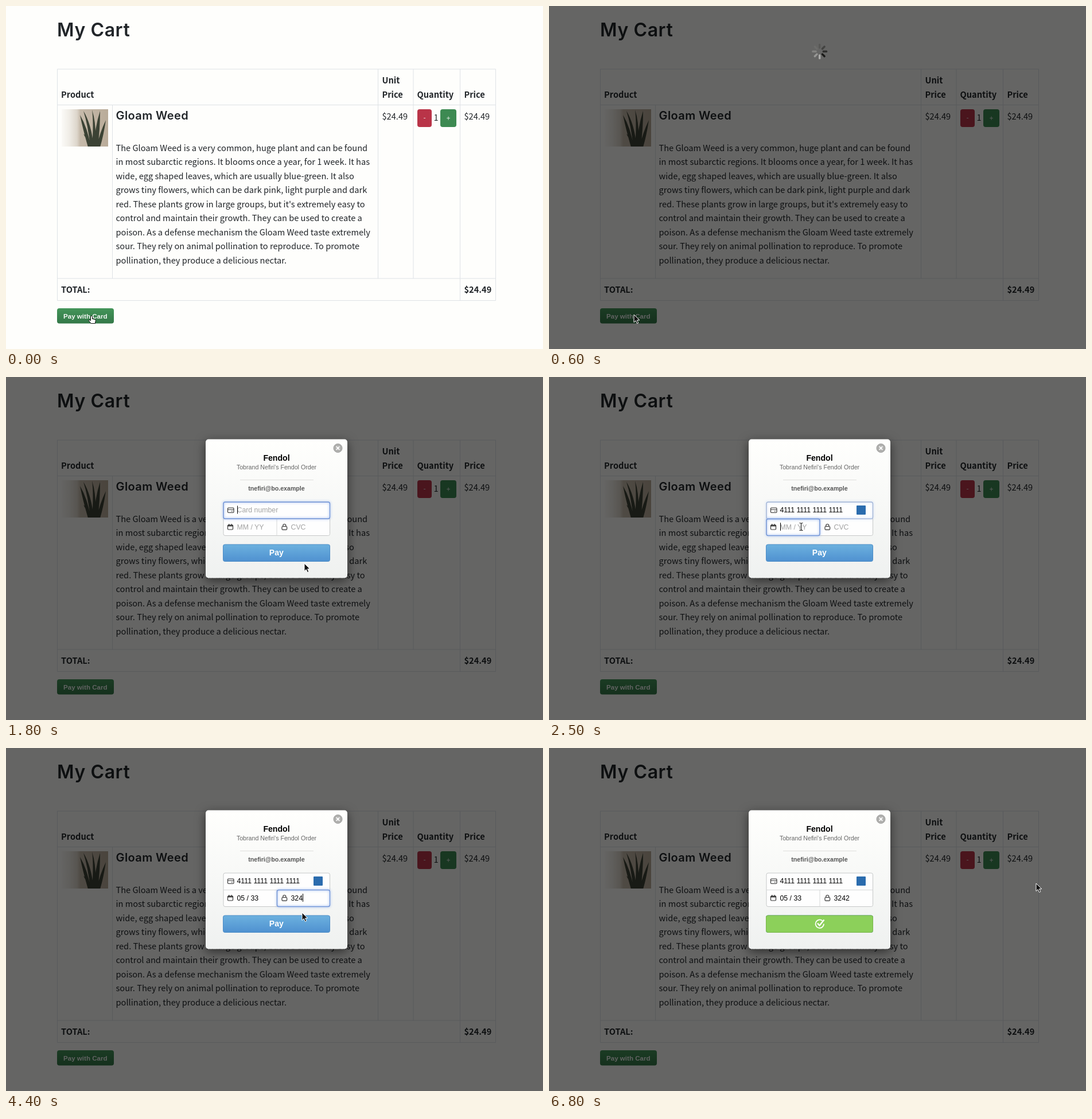
An HTML page for the animation above (6900 ms loop, 936x598 px).

```html
<!DOCTYPE html>
<html lang="en">
<head>
<meta charset="utf-8">
<title>My Cart</title>
<style>
  html, body { margin: 0; width: 100%; height: 100%; overflow: hidden; background: #fefefc; }
  svg { display: block; width: 936px; height: 598px; }
  text { white-space: pre; }
  .body { font: 14.62px "Noto Sans CJK JP", "Noto Sans CJK SC", "Noto Sans CJK", "Open Sans", sans-serif; fill: #212529; }
  .bold { font-weight: 700; }
  .head { font-family: Inter, sans-serif; font-weight: 600; fill: #212529; }
  .ui { font-family: "Liberation Sans", Arial, sans-serif; }
  .mid { text-anchor: middle; }
  .field { font-size: 12.3px; }
  .line { fill: none; stroke: #dee2e6; }
  .icon { fill: none; stroke: #333; stroke-width: 1.2; }
  .ring { fill: none; stroke: #7396d8; stroke-width: 1.4; filter: drop-shadow(0 0 2px #7fa4ee); }
  #modal { transform-origin: 471.5px 230px; }
  #panel { filter: drop-shadow(0 5px 9px rgba(0, 0, 0, .55)); }
</style>
</head>
<body>
<svg viewBox="0 0 936 598">
  <defs>
    <linearGradient id="wall">
      <stop offset="0" stop-color="#fbfaf7"/><stop offset=".16" stop-color="#f0ede7"/>
      <stop offset=".33" stop-color="#ddd6cb"/><stop offset=".4" stop-color="#c6baaa"/>
      <stop offset="1" stop-color="#b9ab99"/>
    </linearGradient>
    <linearGradient id="green" x2="0" y2="1">
      <stop offset="0" stop-color="#439559"/><stop offset="1" stop-color="#347848"/>
    </linearGradient>
    <linearGradient id="blue" x2="0" y2="1">
      <stop offset="0" stop-color="#6cb1df"/><stop offset="1" stop-color="#4f91d0"/>
    </linearGradient>
    <linearGradient id="paper" x2="0" y2="1">
      <stop offset="0" stop-color="#fffffd"/><stop offset="1" stop-color="#eff1f0"/>
    </linearGradient>
    <clipPath id="frame"><rect x="97" y="180" width="81" height="65"/></clipPath>
  </defs>

  <rect width="936" height="598" fill="#fefefc"/>
  <text class="head" x="89" y="52.5" font-size="32" letter-spacing=".6">My Cart</text>

  <path class="line" d="M89.5 110H853.5V513.5H89.5ZM89.5 172.5H853.5M89.5 475H853.5M185.5 172.5V475M648.5 110V475M710 110V475M791.5 110V513.5"/>
  <g class="body bold">
    <text x="96" y="159.5">Product</text>
    <text x="655.5" y="135">Unit</text>
    <text x="655.5" y="159.5">Price</text>
    <text x="716.5" y="159.5">Quantity</text>
    <text x="798.5" y="159.5">Price</text>
    <text x="96" y="500">TOTAL:</text>
    <text x="798.5" y="500">$24.49</text>
  </g>

  <g clip-path="url(#frame)">
    <rect x="97" y="180" width="81" height="65" fill="url(#wall)"/>
    <path fill="#3b4234" d="M143 246Q134 215 129 190Q142 212 148 246ZM147 246Q143 208 135 183Q149 206 153 246ZM150 246Q153 205 150 181Q158 206 156 246ZM154 246Q154 214 164 183Q164 214 160 246ZM158 246Q163 222 174 199Q170 226 164 246ZM147 246Q140 232 135 223Q146 230 151 246Z"/>
  </g>
  <text class="head" x="191.5" y="198" font-size="20" letter-spacing=".4">Gloam Weed</text>
  <g class="body" id="copy"></g>
  <g class="body">
    <text x="655.5" y="198">$24.49</text>
    <text x="798.5" y="198">$24.49</text>
    <text x="745.5" y="199.5">1</text>
  </g>
  <rect x="717" y="180" width="25" height="31" rx="4" fill="#b93448"/>
  <rect x="757" y="180" width="28" height="31" rx="4" fill="#3d8a52"/>
  <g class="body mid" style="font-size:12px;fill:#eee">
    <text x="729.5" y="199">-</text>
    <text x="771" y="199.5">+</text>
  </g>

  <rect x="89" y="527" width="99" height="26.5" rx="4" fill="url(#green)"/>
  <text class="ui mid bold" x="138.3" y="545" font-size="11.55" fill="#f4f8f5">Pay with Card</text>

  <rect id="shade" width="936" height="598"/>
  <g id="spinner" transform="translate(471.7 79.3)"></g>

  <g id="modal">
    <rect id="panel" x="348" y="108.5" width="247" height="242" rx="5" fill="url(#paper)"/>
    <circle cx="578.5" cy="124" r="7.5" fill="#b1b1af" stroke="#8f8f8d" stroke-width=".8"/>
    <path d="M575.7 121.2l5.6 5.6M581.3 121.2l-5.6 5.6" stroke="#fff" stroke-width="1.8"/>
    <g class="ui mid">
      <text class="bold" x="471.5" y="145.7" font-size="14.1">Fendol</text>
      <text x="471.5" y="161" font-size="10.65" fill="#666">Tobrand Nefiri's Fendol Order</text>
      <text class="bold" x="471.5" y="198" font-size="10.65" fill="#555">tnefiri@bo.example</text>
    </g>
    <path d="M408 179.5H536" stroke="#dfdfdd"/>

    <rect x="379" y="218" width="185.5" height="58.5" rx="3" fill="#fefefe" stroke="#c6c8c8"/>
    <path d="M379 247.5H564.5M472 247.5V276.5" stroke="#d6d8d8"/>
    <rect class="ring" id="ring0" x="379" y="218" width="185.5" height="29" rx="3"/>
    <rect class="ring" id="ring1" x="379" y="247.5" width="93" height="29" rx="3"/>
    <rect class="ring" id="ring2" x="472.5" y="247.5" width="92" height="29" rx="3"/>
    <g class="icon">
      <rect x="386.5" y="228" width="10.5" height="8.5" rx="1.5"/>
      <path d="M386.5 231H397M392.5 234H395"/>
      <rect x="386.5" y="258" width="9" height="8" rx="1.2"/>
      <path d="M386.5 259.3H395.5" stroke-width="2.2"/>
      <path d="M388.7 258V256M393.3 258V256"/>
      <rect x="481" y="260.5" width="8.6" height="5.8" rx="1.2"/>
      <path d="M482.8 260.5V259a2.5 2.5 0 0 1 5 0V260.5"/>
    </g>
    <rect id="badge" x="536" y="224" width="16" height="16" rx="1" fill="#2b6cae"/>
    <g class="ui field">
      <text id="text0" x="402.5" y="236.2"></text>
      <text id="text1" x="402.5" y="265.7"></text>
      <text id="text2" x="496.5" y="265.7"></text>
    </g>
    <rect id="caret" width="1" height="14"/>

    <rect x="378.5" y="292" width="186" height="29.5" rx="3" fill="url(#blue)" stroke="#4c8cc6"/>
    <text id="pay" class="ui mid bold" x="471.3" y="311" font-size="14" fill="#fff">Pay</text>
    <rect id="done" x="378.5" y="292" width="186" height="29.5" rx="3" fill="#8cd05a" stroke="#78b54a"/>
    <g id="tick" fill="none" stroke="#fff" stroke-width="1.7">
      <path d="M476.5 301.2A7.2 7.2 0 1 0 479 306.5"/>
      <path id="check" d="M468 305.5L471.5 309.5L479.5 299.5" stroke-width="2.4" pathLength="1" stroke-dasharray="1 2"/>
    </g>
  </g>

  <g id="cursor">
    <path id="arrow" d="M0 0V13.5L3.2 10.6L5.4 15.6L7.8 14.5L5.6 9.7H9.8Z" fill="#111" stroke="#fff"/>
    <path id="hand" d="M-1.5 1Q0 -1 1.5 1V5.5L6 6.3Q7.5 6.7 7.3 8.5L6.3 13.5H-.8L-5 8.3Q-4.5 6.3 -1.5 8.6Z" fill="#fff" stroke="#111"/>
    <g id="beam" fill="none">
      <path d="M-3 -6.5Q0 -6.5 0 -5Q0 -6.5 3 -6.5M0 -5V5M-3 6.5Q0 6.5 0 5Q0 6.5 3 6.5" stroke="#fff" stroke-width="2.6"/>
      <path d="M-3 -6.5Q0 -6.5 0 -5Q0 -6.5 3 -6.5M0 -5V5M-3 6.5Q0 6.5 0 5Q0 6.5 3 6.5" stroke="#111" stroke-width="1.1"/>
    </g>
  </g>
</svg>
<script>
const LOOP = 6900, STEP = 100;
const $ = id => document.getElementById(id);
const clamp = v => Math.min(1, Math.max(0, v));
const ramp = (t, from, to) => clamp((t - from) / (to - from));
const ease = v => v * v * (3 - 2 * v);
const fade = (id, v) => $(id).setAttribute('opacity', v);

function add(parent, tag, attrs, text = '') {
  const el = document.createElementNS('http://www.w3.org/2000/svg', tag);
  for (const k in attrs) el.setAttribute(k, attrs[k]);
  el.textContent = text;
  return parent.appendChild(el);
}

[
  'The Gloam Weed is a very common, huge plant and can be found',
  'in most subarctic regions. It blooms once a year, for 1 week. It has',
  'wide, egg shaped leaves, which are usually blue-green. It also',
  'grows tiny flowers, which can be dark pink, light purple and dark',
  "red. These plants grow in large groups, but it's extremely easy to",
  'control and maintain their growth. They can be used to create a',
  'poison. As a defense mechanism the Gloam Weed taste extremely',
  'sour. They rely on animal pollination to reproduce. To promote',
  'pollination, they produce a delicious nectar.'
].forEach((line, i) => add($('copy'), 'text', { x: 191.5, y: 252.5 + i * 24.5 }, line));

const spokes = Array.from({ length: 8 }, (_, i) => add($('spinner'), 'rect', {
  x: 5, y: -1.7, width: 8.5, height: 3.4, rx: 1.5, transform: `rotate(${i * 45})`
}));

// time, x, y
const path = [
  [0, 149, 540], [299, 149, 540], [300, 148, 538], [600, 148, 538], [1000, 430, 230],
  [1200, 435, 226], [1600, 448, 270], [1800, 520, 325], [2000, 520, 325], [2400, 439.5, 261],
  [3000, 439.5, 261], [3600, 484, 264], [3800, 500, 264], [4300, 546, 282], [4400, 516, 287],
  [4500, 516, 287], [4800, 478, 302], [5200, 478, 302], [5500, 290, 150], [5700, 230, 20],
  [5900, 560, 110], [6000, 737, 178], [6100, 737, 178], [6200, 849, 236], [LOOP, 849, 236]
];
// start time, cursor shape
const shapes = [[0, 'hand'], [300, 'arrow'], [1100, 'beam'], [1700, 'arrow'], [2300, 'beam'],
  [4200, 'arrow'], [4700, 'hand'], [5300, 'arrow']];
// start time, typed value
const fields = [
  { hint: 'Card number', focus: [1000, 2400], keys: [[2100, '4111 1111 1111 1111']] },
  { hint: 'MM / YY', focus: [2400, 3700], keys: [[2600, '0'], [2700, '05 / '], [3200, '05 / 3'], [3400, '05 / 33']] },
  { hint: 'CVC', focus: [3700, 4900], keys: [[4100, '3'], [4200, '32'], [4400, '324'], [4600, '3242']] }
];
const latest = (list, t) => list.filter(k => k[0] <= t).pop();

function position(t) {
  const i = Math.max(1, path.findIndex(p => p[0] >= t));
  const [t0, x0, y0] = path[i - 1], [t1, x1, y1] = path[i];
  const k = ease(ramp(t, t0, t1));
  return [x0 + (x1 - x0) * k, y0 + (y1 - y0) * k];
}

function drawFields(t) {
  fade('caret', 0);
  fields.forEach(({ hint, focus: [on, off], keys }, i) => {
    const key = latest(keys, t), text = $('text' + i);
    text.textContent = key ? key[1] : hint;
    text.setAttribute('fill', key ? '#000' : '#a3a3a3');
    const glow = i ? ramp(t, on - 50, on + 100) : 1;
    fade('ring' + i, glow * (1 - ramp(t, off, off + 200)));
    if (t < on || t >= off) return;
    const x = +text.getAttribute('x') + (key ? text.getComputedTextLength() : 0.5);
    $('caret').setAttribute('x', x);
    $('caret').setAttribute('y', i ? 254 : 224.5);
    fade('caret', 1);
  });
  fade('badge', t >= 2100 ? 1 : 0);
}

function draw(t) {
  fade('shade', 0.6 * ease(ramp(t, 300, 610)));

  fade('spinner', ramp(t, 300, 550) * (t < 1000 ? 1 : 0));
  const lead = Math.floor((t - 375) / 125);
  spokes.forEach((s, i) => {
    const age = ((lead - i) % 8 + 8) % 8;
    const v = 25 + age * 21;
    s.setAttribute('fill', `rgb(${v},${v},${v - 2})`);
  });

  const open = ramp(t, 900, 1100);
  fade('modal', open);
  $('modal').style.transform = `scale(${0.95 + 0.05 * ease(open)})`;
  drawFields(t);

  fade('pay', 1 - ramp(t, 5000, 5200));
  fade('done', ramp(t, 5300, 5600));
  fade('tick', ramp(t, 5500, 5800));
  $('check').setAttribute('stroke-dashoffset', 1 - ramp(t, 5600, 6000));

  $('cursor').setAttribute('transform', `translate(${position(t)})`);
  const shape = latest(shapes, t)[1];
  ['arrow', 'hand', 'beam'].forEach(id => fade(id, id === shape ? 1 : 0));
}

const start = performance.now();
function tick() {
  const t = (performance.now() - start) % LOOP;
  draw(Math.floor(t / STEP) * STEP);
  requestAnimationFrame(tick);
}
tick();
</script>
</body>
</html>
```
